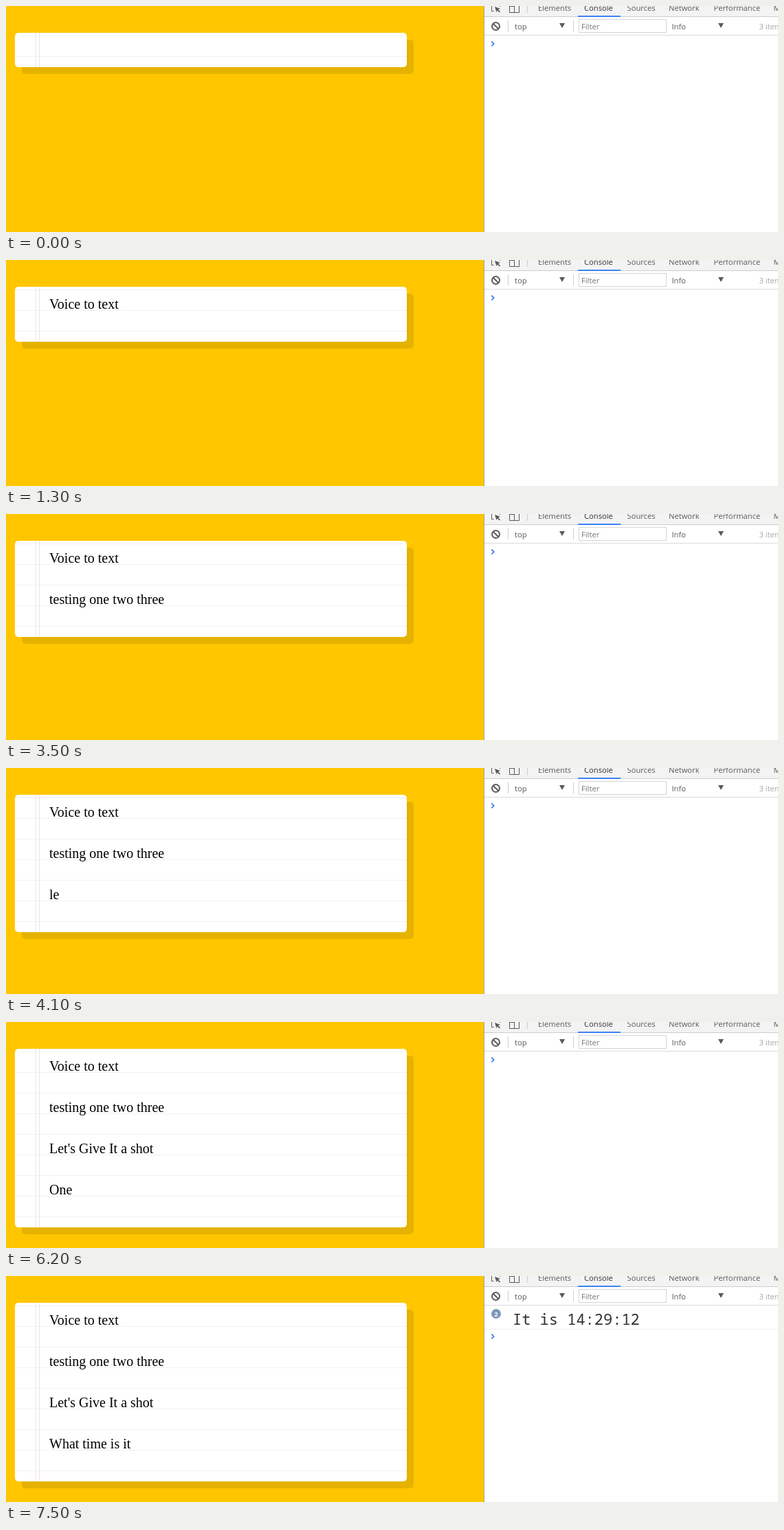
Recreate the animation shown at these times as an HTML page. Size 1123 px wide and 329 px high, loop 8700 ms.

```html
<!DOCTYPE html>
<html lang="en">
<head>
<meta charset="utf-8">
<title>Voice to text</title>
<style>
  html, body { margin: 0; width: 100%; height: 100%; overflow: hidden; background: #ffc600; }
  .words {
    position: absolute; left: 13px; top: 39px; width: 500px; padding: 10px 20px 10px 50px;
    font: 20px/30px "Liberation Serif", serif; color: #000; white-space: nowrap;
    background: linear-gradient(#eff1f2 1px, #fff 1px) 0 4px / 100% 30px;
    border-radius: 5px; box-shadow: 10px 10px 0 rgba(0, 0, 0, .1);
  }
  .words::before {
    content: ""; position: absolute; left: 30px; top: 0; bottom: 0; width: 4px;
    border: solid #efe4e4; border-width: 0 1px;
  }
  p { margin: 0 0 30px; }
  svg { position: absolute; left: 0; top: 0; font: 11.2px "Open Sans", sans-serif; }
</style>
</head>
<body>
<div class="words" id="words"></div>

<svg width="1123" height="329" fill="#5a5a5a">
  <path fill="#fff" d="M695 0h428v329H695z"/>
  <path fill="#f3f3f3" d="M696 0h427v15H696z"/>
  <path fill="#a3a3a3" d="M695 0h1v329h-1z"/>
  <path fill="#ccc" d="M696 15h427v1H696zM758 0h1v10h-1zM730 21h1v16h-1zM825 21h1v16h-1z"/>
  <path fill="#dadada" d="M696 42h427v1H696z"/>
  <path fill="#3e82f7" d="M832 14h62v2h-62z"/>

  <g fill="none" stroke="#5a5a5a">
    <path d="M706.5 0v7.5h3M718.5 0v1"/>
    <path d="M732.5 0v9.5h14V0M732 .5h8M739.5 1v8"/>
    <g stroke-width="2"><circle cx="712.5" cy="29.5" r="5.5"/><path d="M708.5 25.5l8 8"/></g>
    <path stroke="#d4d4d4" d="M833.5 19.5h127v19h-127z"/>
  </g>
  <path d="M711 1l8 3-3 1.2 3 3-1.2 1.2-3-3-1.3 2.6z"/>
  <path d="M805 25h8l-4 7zM1036 25h8l-4 7z"/>

  <text x="774" y="7">Elements</text>
  <text x="841" y="7" fill="#333">Console</text>
  <text x="903.5" y="7">Sources</text>
  <text x="964" y="7">Network</text>
  <text x="1029.5" y="7">Performance</text>
  <text x="1116.5" y="7">Memory</text>
  <text x="740" y="34">top</text>
  <text x="837" y="34" fill="#757575">Filter</text>
  <text x="968.5" y="34">Info</text>
  <text x="1095.5" y="34" fill="#a5a5a5">3 items hidden</text>

  <g id="log">
    <circle cx="713" cy="55" r="7" fill="#8097bd"/>
    <text x="713" y="58.5" fill="#fff" font-size="9.5" font-weight="700" text-anchor="middle">2</text>
    <text x="737" y="71" fill="#303030" style="font: 22px 'Noto Sans Mono', monospace">It is 14:29:12</text>
    <path fill="#f0f0f0" d="M696 77h427v1H696z"/>
  </g>
  <path id="prompt" fill="none" stroke="#367cf1" stroke-width="1.7" d="M706.3 51.7l3.4 3.3-3.4 3.3"/>
</svg>

<script>
  const LOOP = 8700, REPLY = 7500;

  // Each recognised phrase: [time in ms, transcript so far]
  const phrases = [
    [[1200, "voice"], [1300, "Voice to text"]],
    [[2300, "teste"], [2900, "teste, one"], [3000, "teste one, two"],
     [3100, "teste one two, three"], [3300, "teste one two three"], [3500, "testing one two three"]],
    [[4100, "le"], [4200, "let"], [4300, "Let's"], [4500, "Let's, Get"], [4600, "Let's, Get it"],
     [4700, "Let's, Get it out"], [4900, "Let's, Give it to"], [5200, "Let's Give it to"],
     [5400, "Let's Give It a shot"]],
    [[6200, "One"], [6300, "what"], [6600, "What, time"], [6900, "what time, is"],
     [7100, "What time, is"], [7200, "What time is, it"], [7500, "What time is it"]]
  ];

  const words = document.getElementById("words");
  const log = document.getElementById("log");
  const prompt = document.getElementById("prompt");
  let shown = null;

  function draw() {
    const t = performance.now() % LOOP;
    const lines = phrases
      .map(steps => steps.filter(([at]) => at <= t).pop())
      .filter(Boolean)
      .map(([, text]) => text);
    const html = lines.length ? lines.map(text => `<p>${text}</p>`).join("") : "<p></p>";
    if (html !== shown) words.innerHTML = shown = html;

    const replied = t >= REPLY;
    log.setAttribute("visibility", replied ? "visible" : "hidden");
    prompt.setAttribute("transform", `translate(0 ${replied ? 33 : 0})`);
    requestAnimationFrame(draw);
  }
  draw();
</script>
</body>
</html>
```
